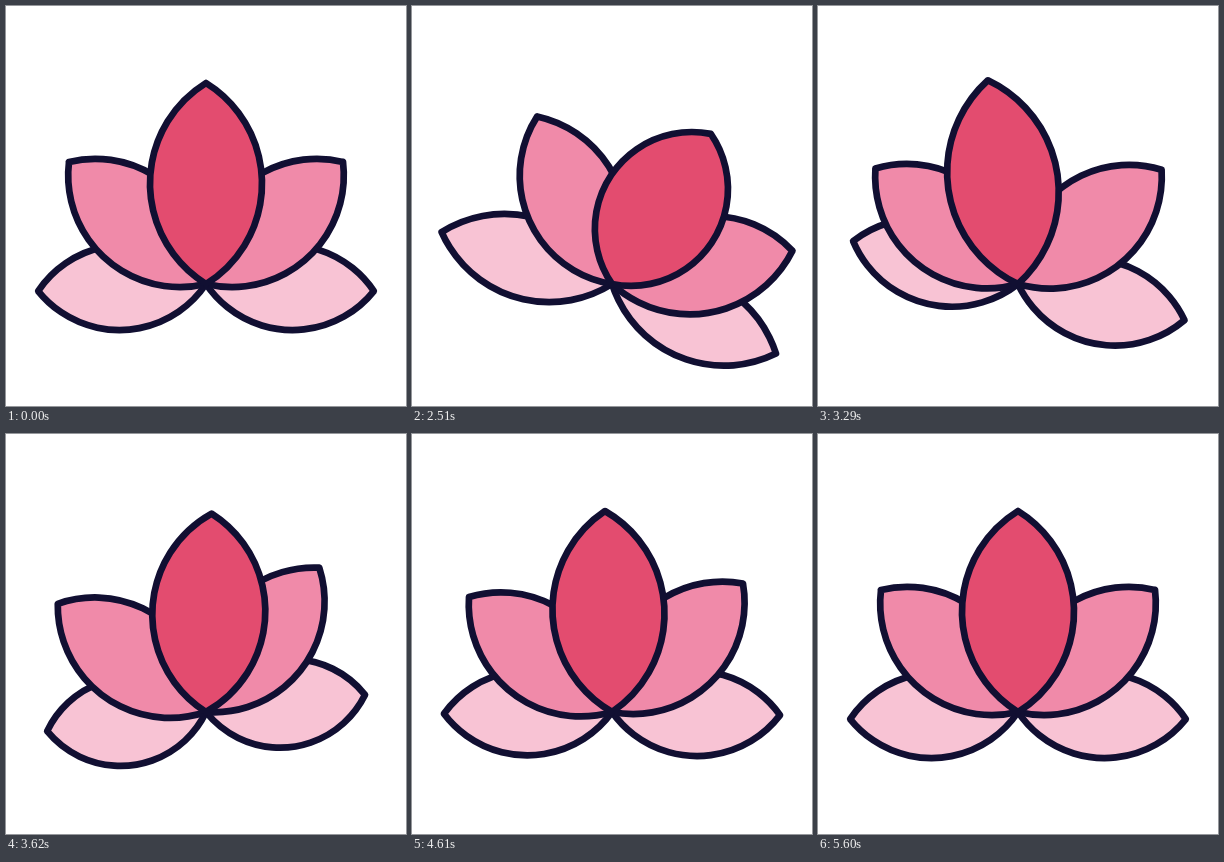
These frames come from a looping animation (400 px wide and 400 px high, 5.63 s). An HTML page with a canvas:

```html
<!DOCTYPE html>
<html lang="en">
<head>
<meta charset="utf-8">
<title>Swaying lotus</title>
<style>
  html, body { margin: 0; width: 100%; height: 100%; overflow: hidden; background: #fff; }
  canvas { display: block; width: 100vmin; height: 100vmin; }
</style>
</head>
<body>
<canvas id="stage"></canvas>
<script>
const LOOP = 5630, GUST = 2000, STEP = 30, HALF_SWING = 570;
const BASE = { x: 200, y: 278 };
const INK = '#110f32';

const low = { length: 168, bulge: 42.5, lean: 0, fill: '#f8c3d4',
  stretch: { size: .096, peak: 2870, trough: 3640, rebound: .5, decay: .25 } };
const middle = { length: 183.5, bulge: 48, lean: .07, fill: '#f08aa9', stretch: null };
const centre = { length: 201, bulge: 56, lean: 0, fill: '#e34c6f',
  stretch: { size: -.106, peak: 2500, trough: 3040, rebound: .47, decay: .25 } };

// Angles are in degrees from upright; peak and trough are the times of the first two extremes.
const petal = (shape, rest, size, peak, trough) =>
  ({ ...shape, rest, sway: { size, peak, trough, rebound: .26, decay: .6 } });

const petals = [
  petal(low, -92.4, 33.3, 2920, 3790),
  petal(low, 92.4, 33.3, 2880, 3640),
  petal(middle, -48.3, 31, 2730, 3460),
  petal(middle, 48.3, 40, 2730, 3580),
  petal(centre, 0, 33.5, 2530, 3240)
];

const canvas = document.getElementById('stage');
const ctx = canvas.getContext('2d');

const smooth = u => u * u * (3 - 2 * u);

// Swings out to the peak, then back and forth through shrinking extremes until it rests.
function swing({ size, peak, trough, rebound, decay }, t) {
  if (t <= GUST) return 0;
  if (t < peak) return size * smooth((t - GUST) / (peak - GUST));
  let from = size, to = -size * rebound;
  if (t < trough) return from + (to - from) * smooth((t - peak) / (trough - peak));
  const turns = (t - trough) / HALF_SWING;
  const count = Math.floor(turns);
  if (count > 2) return 0;
  from = to * Math.pow(-decay, count);
  to = count < 2 ? -from * decay : 0;
  return from + (to - from) * smooth(turns - count);
}

// Traces one side of a lens from tip to base (side 1) or base to tip (side -1).
function traceSide(half, bulge, side) {
  const radius = (half * half + bulge * bulge) / (2 * bulge);
  const offset = radius - bulge;
  const spread = Math.atan2(half, offset);
  const facing = side > 0 ? 0 : Math.PI;
  ctx.arc(-side * offset, -half, radius, facing - spread, facing + spread);
}

function drawPetal({ rest, length, bulge, lean, fill, stretch, sway }, t) {
  const scale = stretch ? 1 + swing(stretch, t) : 1;
  const half = length * scale / 2;
  const width = bulge * Math.pow(scale, -.7);
  const turn = swing(sway, t);

  ctx.save();
  ctx.translate(BASE.x, BASE.y);
  ctx.rotate((rest + turn) * Math.PI / 180);
  ctx.beginPath();
  traceSide(half, width - lean * turn, 1);
  traceSide(half, width + lean * turn, -1);
  ctx.closePath();
  ctx.fillStyle = fill;
  ctx.fill();
  ctx.stroke();
  ctx.restore();
}

function resize() {
  const ratio = window.devicePixelRatio || 1;
  const side = Math.round(Math.min(innerWidth, innerHeight) * ratio) || 400;
  if (canvas.width !== side) canvas.width = canvas.height = side;
  ctx.setTransform(side / 400, 0, 0, side / 400, 0, 0);
}

function render(now) {
  const time = now % LOOP;
  const t = GUST + Math.floor((time - GUST) / STEP) * STEP;
  resize();
  ctx.fillStyle = '#fff';
  ctx.fillRect(0, 0, 400, 400);
  ctx.strokeStyle = INK;
  ctx.lineWidth = 6.7;
  ctx.lineJoin = 'round';
  petals.forEach(item => drawPetal(item, t));
}

const start = performance.now();
function tick() {
  render(performance.now() - start);
  requestAnimationFrame(tick);
}
tick();
</script>
</body>
</html>
```
